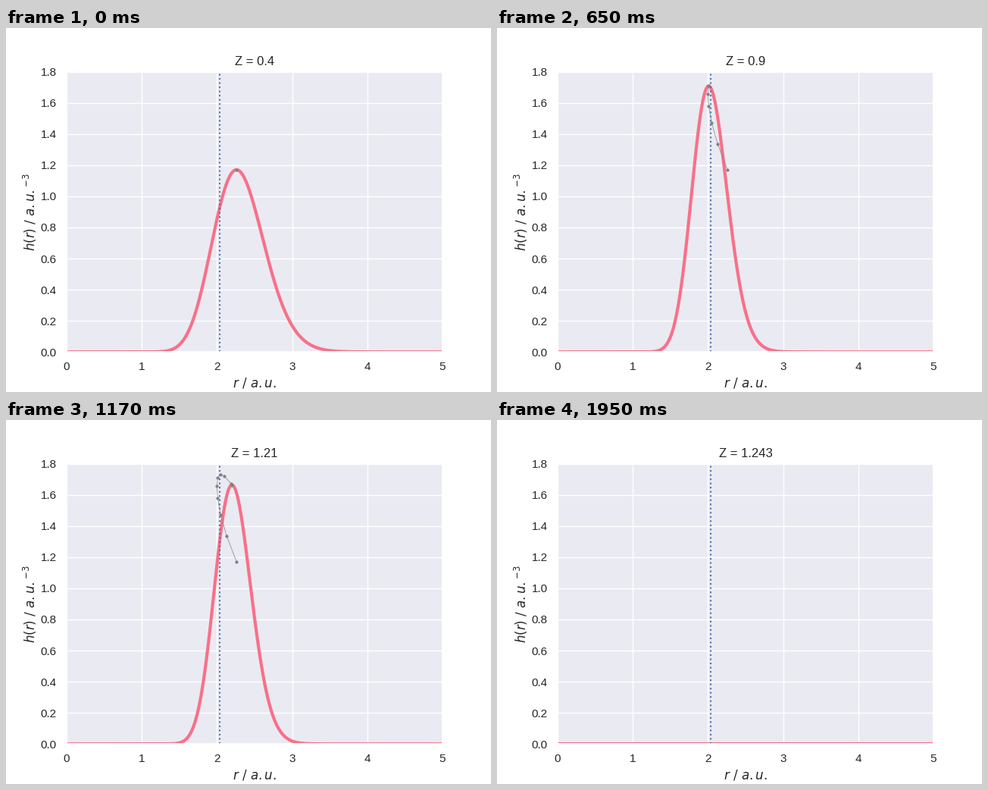
These frames come from a looping animation (640x480 px, 2080 ms). A matplotlib script:

```python
import numpy as np
import matplotlib.pyplot as plt
from matplotlib.animation import FuncAnimation

plt.rcParams.update({
    "font.family": "Liberation Sans",
    "mathtext.fontset": "dejavusans",
    "text.color": "0.15",
    "axes.labelcolor": "0.15",
    "axes.facecolor": "#eaeaf2",
    "axes.edgecolor": "white",
    "axes.linewidth": 1.25,
    "axes.axisbelow": True,
    "grid.color": "white",
    "grid.linewidth": 1,
})

PINK, BLUE, GREY = "#f77189", "#4c72b0", "#808080"

# The charge grows in ever finer steps towards the critical value
charges = np.concatenate([
    0.4 + 0.1 * np.arange(9),
    1.2 + 0.01 * np.arange(1, 5),
    1.24 + 0.001 * np.arange(1, 4),
])
bound = len(charges) - 1  # the last charge no longer binds

# Smooth path of the maximum through a few key charges
key_z = np.linspace(0.4, 1.2, 5)
peak_r = np.polyval(np.polyfit(key_z, [2.26, 2.05, 1.999, 2.042, 2.188], 4),
                    charges)
peak_h = np.polyval(np.polyfit(key_z, [1.17, 1.471, 1.656, 1.731, 1.671], 4),
                    charges)

r = np.linspace(0, 5, 1001)


def density(r0, h0):
    """Skewed bell with unit area."""
    width = 1 / (h0 * r0 * np.sqrt(2 * np.pi))
    u = 3 * (np.cbrt(r / r0) - 1)
    return h0 * np.exp(-u**2 / (2 * width**2))


fig, ax = plt.subplots(figsize=(6.4, 4.8), dpi=100)
ax.set(xlim=(0, 5), ylim=(0, 1.8),
       xticks=range(6), yticks=np.arange(10) * 0.2)
ax.yaxis.set_major_formatter("{x:.1f}")
ax.tick_params(length=6, labelsize=11, labelcolor="0.15",
               bottom=False, left=False)
ax.tick_params(axis="x", pad=3)
ax.grid(True)
ax.set_xlabel(r"$r\ /\ a.u.$", fontsize=12)
ax.set_ylabel(r"$h(r)\ /\ a.u.^{-3}$", fontsize=12, labelpad=2.2)
title = ax.set_title("", fontsize=12)

curve, = ax.plot([], [], color=PINK, lw=3)
ax.axvline(2.033, color=BLUE, lw=1.5, ls=":")
trail, = ax.plot([], [], color=GREY, lw=0.5, marker=".", ms=4)


def update(i):
    title.set_text(f"Z = {charges[i]:.4g}")
    if i < bound:
        curve.set_data(r, density(peak_r[i], peak_h[i]))
        trail.set_data(peak_r[:i + 1], peak_h[:i + 1])
    else:
        curve.set_data(r, np.zeros_like(r))
        trail.set_data([], [])
    return curve, trail, title


anim = FuncAnimation(fig, update, frames=len(charges), interval=130,
                     repeat=True, repeat_delay=0)
plt.show()
```
